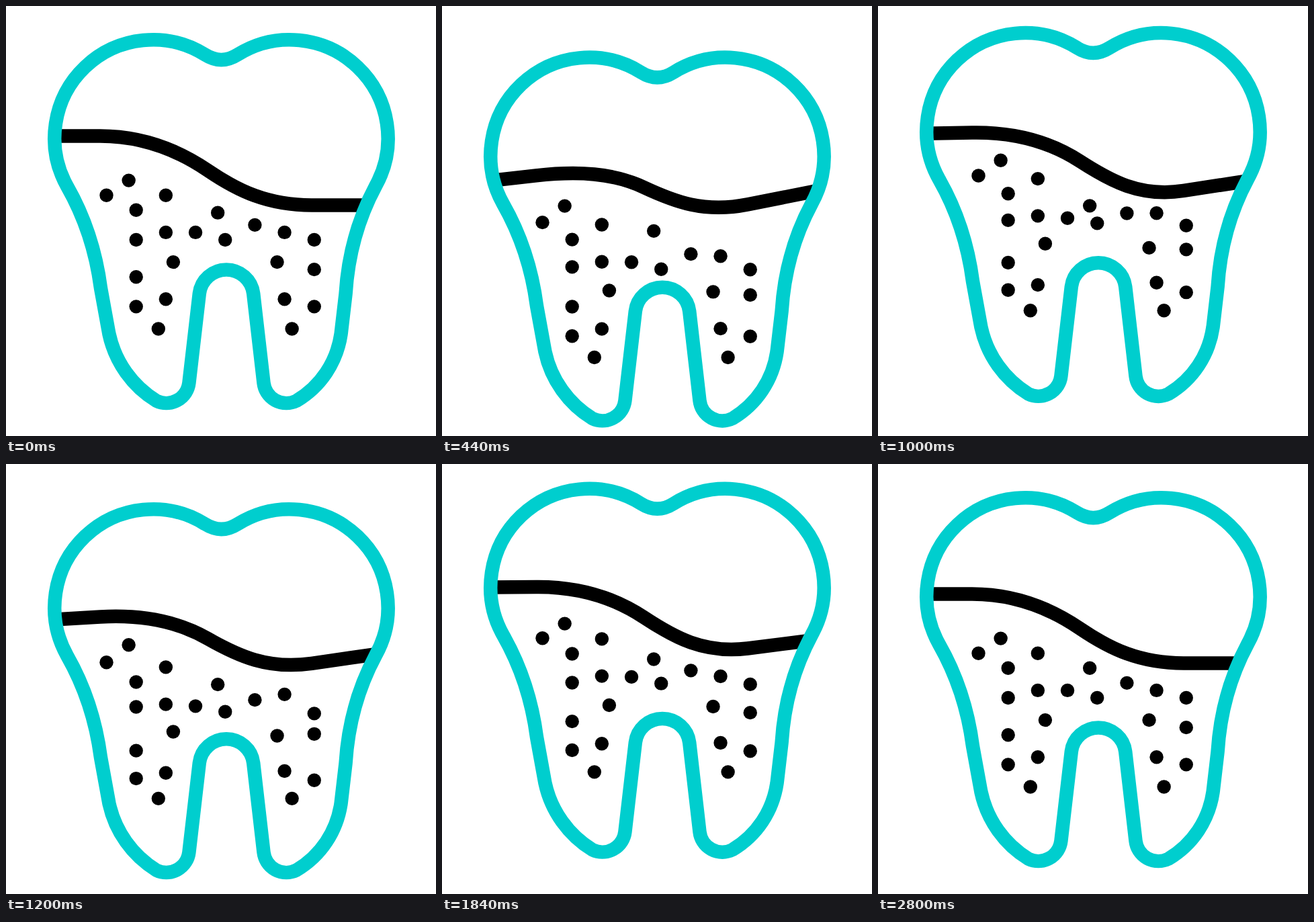
An HTML page that plays this animation: 640x640 px, repeating every 3.2 s.

```html
<!DOCTYPE html>
<html lang="en">
<head>
<meta charset="utf-8">
<title>Tooth</title>
<style>
  html, body { margin: 0; width: 100%; height: 100%; overflow: hidden; background: #fff; }
  svg { display: block; width: 100vw; height: 100vh; }
  .outline { fill: none; stroke: #00cece; stroke-width: 20.5; stroke-linejoin: round; }
  .level { fill: none; stroke: #000; stroke-width: 20.5; }
</style>
</head>
<body>
<svg viewBox="0 0 640 640">
  <defs>
    <path id="shape" d="M296.4 72.5 A146.5 146.5 0 0 0 90.8 268
      C115.4 311 133.4 362 141 420 L153.4 488 C162.4 530 188.4 566 224 587.7
      A34 34 0 0 0 272.4 561 L287.8 428 A40.5 40.5 0 0 1 368.2 428 L383.5 561
      A34 34 0 0 0 432.3 587.6 C468.5 566 492.5 530 498.6 488 L505.6 428
      C508.6 380 519.6 325 550.1 268 A146.5 146.5 0 0 0 344.5 72.5 Q320.4 87.6 296.4 72.5 Z"/>
    <clipPath id="inside"><use href="#shape"/></clipPath>
  </defs>
  <g id="tooth">
    <g clip-path="url(#inside)"><path id="level" class="level"/></g>
    <g id="dots"></g>
    <use href="#shape" class="outline"/>
  </g>
</svg>
<script>
const LOOP = 3200, END = 2800, STEP = 40;

// Swing extremes, one per beat; everything settles at zero
const BOUNCE = [0, 28, -31.7, 18.1, -19.2];
const DRIFT = [0, 18, -19.6, 9, -9, 4];
const LEFT = [0, 40, -5, 21, 7, -5, 12];
const RIGHT = [0, -45, -21, -29, -24, -8.5, -28];

// Dots sit on a grid as [column, row], grouped by delay in steps
const GRID = { x: 149.5, y: 259.6, size: 11.045 };
const DOTS = {
  "-3": [[15, 4]],
  0: [[20, 6]],
  1: [[12, 7], [23, 11], [28, 17], [4, 13], [8, 16], [28, 8]],
  2: [[4, 4], [8, 2], [8, 7], [16, 8], [24, 16], [4, 17]],
  3: [[25, 20], [7, 20], [9, 11]],
  4: [[0, 2], [4, 8]],
  5: [[3, 0], [28, 12]],
  6: [[24, 7]]
};

// The first two beats are one step shorter than the rest
const beat = i => Math.min(END, i * 440 - STEP * Math.min(i, 2));
const smooth = p => p * p * (3 - 2 * p);

function swing(extremes, t) {
  if (t <= 0 || t >= END) return 0;
  let i = 0;
  while (beat(i + 1) <= t) i++;
  const from = extremes[i] ?? 0, to = extremes[i + 1] ?? 0;
  return from + (to - from) * smooth((t - beat(i)) / (beat(i + 1) - beat(i)));
}

function levelPath(t) {
  const a = swing(LEFT, t), b = swing(RIGHT, t);
  const y0 = 193.5 + a, y1 = 193.5 + 0.84 * a;
  const y2 = 296.5 + 0.4 * b - 0.25 * a, y3 = 296.5 + b;
  const left = (y1 - y0) / 55, right = (y3 - y2) / 85;
  const mid = 244.5 + 0.2 * (a + b), slope = 0.68 - 0.0055 * a;
  return `M60 ${y0 - 25 * left} L140 ${y1}
    C203 ${y1 + 63 * left} 255 ${mid - 45 * slope} 300 ${mid}
    C346 ${mid + 46 * slope} 390 ${y2 - 65 * right} 455 ${y2}
    L590 ${y2 + 135 * right}`;
}

const tooth = document.getElementById("tooth");
const level = document.getElementById("level");
const group = document.getElementById("dots");

function makeDot([col, row], delay) {
  const el = document.createElementNS("http://www.w3.org/2000/svg", "circle");
  el.setAttribute("cx", GRID.x + col * GRID.size);
  el.setAttribute("r", 10.2);
  group.append(el);
  return { el, y: GRID.y + row * GRID.size, delay: delay * STEP };
}

const dots = Object.entries(DOTS).flatMap(([delay, cells]) =>
  cells.map(cell => makeDot(cell, delay)));

function draw(t) {
  tooth.setAttribute("transform", `translate(0 ${swing(BOUNCE, t)})`);
  level.setAttribute("d", levelPath(t));
  for (const { el, y, delay } of dots) {
    el.setAttribute("cy", y + swing(DRIFT, t - delay));
  }
}

const start = performance.now();
function tick() {
  const t = (performance.now() - start) % LOOP;
  draw(Math.min(END, Math.floor(t / STEP) * STEP));
  requestAnimationFrame(tick);
}
tick();
</script>
</body>
</html>
```
